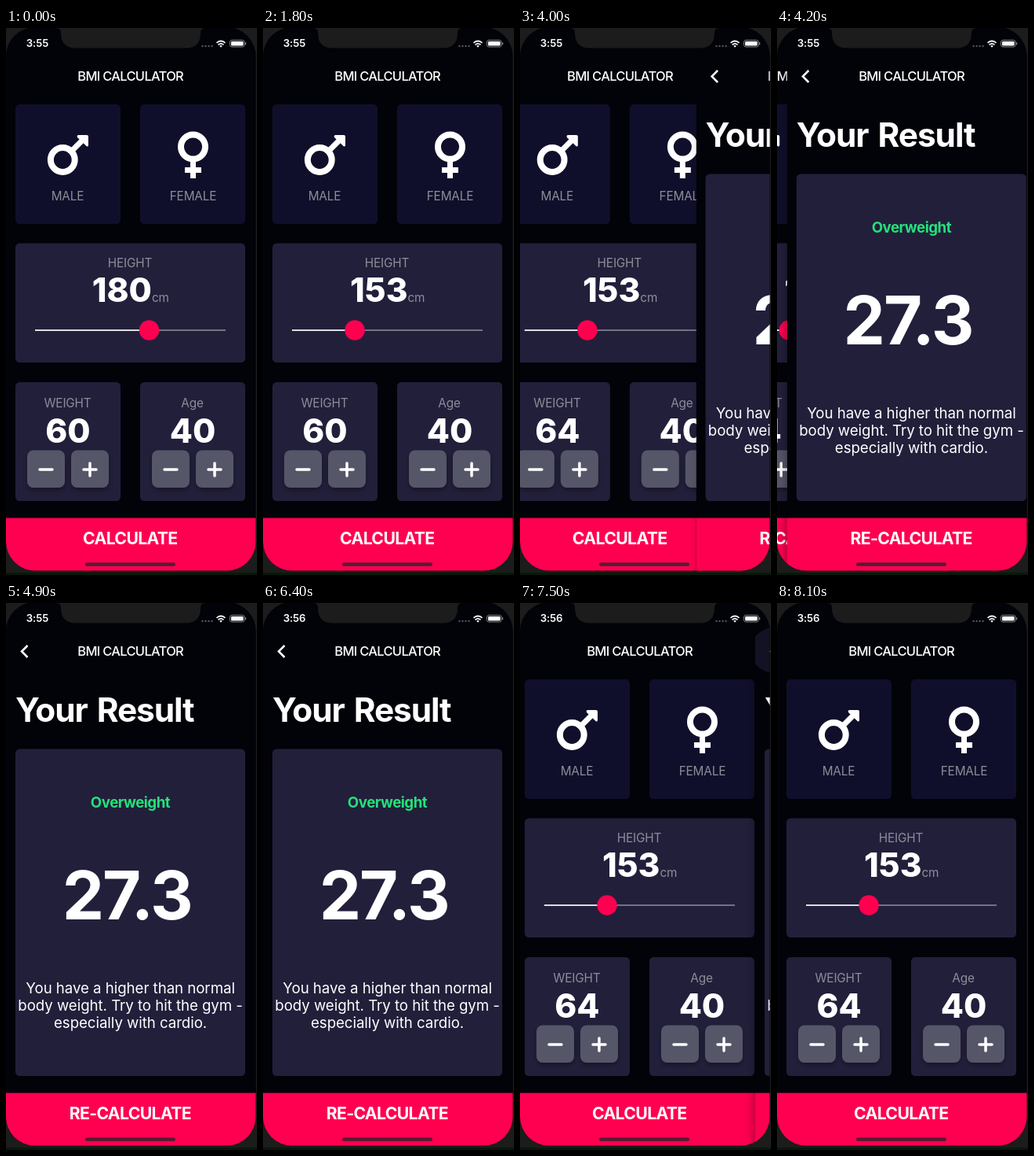
An HTML page that plays this animation: 320x695 px, repeating every 8200 ms.

```html
<!DOCTYPE html>
<html lang="en">
<head>
<meta charset="utf-8">
<title>BMI Calculator</title>
<style>
html, body { margin: 0; width: 100%; height: 100%; overflow: hidden; background: #1b1c1b; }
svg { display: block; width: 320px; height: 695px; }
text { font-family: Inter, Roboto, sans-serif; fill: #fff; text-anchor: middle; white-space: pre; }
.label { font-size: 15.3px; letter-spacing: -.15px; fill: #8d8e98; }
.num { font-size: 42.4px; font-weight: 800; letter-spacing: 0; }
.title { font-size: 16.5px; font-weight: 500; letter-spacing: -.7px; }
.big { font-size: 21.2px; font-weight: 700; letter-spacing: -.65px; }
.body { font-size: 18.7px; letter-spacing: -.06px; }
.heading { font-size: 42.4px; font-weight: 700; letter-spacing: -1.1px; word-spacing: 3.2px; text-anchor: start; }
.grade { font-size: 18.7px; font-weight: 700; letter-spacing: -.5px; fill: #24e27a; }
.bmi { font-size: 84.8px; font-weight: 700; letter-spacing: -2.1px; }
.clock { font-size: 13.2px; font-weight: 600; letter-spacing: -.1px; }
.line { fill: none; stroke: #fff; }
</style>
</head>
<body>
<svg viewBox="0 0 320 695">
  <defs>
    <clipPath id="screen"><rect y="-1" width="318.5" height="690.6" rx="37"/></clipPath>
    <clipPath id="page"><rect width="320" height="695"/></clipPath>
    <linearGradient id="shade">
      <stop offset="0" stop-opacity="0"/>
      <stop offset=".3" stop-opacity=".016"/>
      <stop offset=".6" stop-opacity=".07"/>
      <stop offset="1" stop-opacity=".22"/>
    </linearGradient>
    <filter id="soft" x="-30%" y="-30%" width="160%" height="170%">
      <feDropShadow dx="0" dy="3" stdDeviation="3" flood-color="#000" flood-opacity=".35"/>
    </filter>
  </defs>
  <rect y="692" width="320" height="3" fill="#08190a"/>
  <g clip-path="url(#screen)">
    <rect width="320" height="695" fill="#020308"/>
    <g id="form"></g>
    <g id="result"></g>
    <rect x="101" y="679.3" width="115" height="4.5" rx="2.2" fill="#541c33"/>
  </g>
  <g id="status"></g>
</svg>
<script>
const LOOP = 8200, STEP = 100, WIDTH = 318;
const NAVY = '#100f2b', SLATE = '#221f3b', PINK = '#ff0050';
const $ = id => document.getElementById(id);

const text = (x, y, cls, str, id) =>
  `<text x="${x}" y="${y}" class="${cls}"${id ? ` id="${id}"` : ''}>${str}</text>`;
const card = (x, y, w, h, fill) =>
  `<rect x="${x}" y="${y}" width="${w}" height="${h}" rx="5.5" fill="${fill}"/>`;
const line = (d, w, extra = '') =>
  `<path class="line" d="${d}" stroke-width="${w}" ${extra}/>`;

const button = (x, plus) =>
  `<rect x="${x}" y="536.5" width="48" height="47.5" rx="8" fill="#565769" filter="url(#soft)"/>` +
  line(`M${x + 16} 561h16` + (plus ? `M${x + 24} 553v16` : ''), 3.5, 'stroke-linecap="round"');

const counter = (x, label, value, id) =>
  card(x, 450, 134, 151, SLATE) +
  text(x + 66.5, 482, 'label', label) +
  text(x + 67, 527, 'num', value, id) +
  button(x + 15, false) + button(x + 71, true);

const footer = label =>
  `<rect y="622.5" width="320" height="73" fill="${PINK}"/>` + text(158.3, 655.5, 'big', label);

const male =
  '<circle class="line" cx="72.3" cy="167.5" r="15.4" stroke-width="8"/>' +
  line('M83 157L99 141', 7) +
  '<path d="M92.5 136H103q2 0 2 2v10.5q0 3-2.5 1.5L91 139q-1-3 1.5-3z" fill="#fff"/>';
const female =
  '<circle class="line" cx="238.5" cy="151" r="15.5" stroke-width="8"/>' +
  line('M238.5 169V191M228 180.5H249', 7);

$('form').innerHTML =
  text(158.7, 67, 'title', 'BMI CALCULATOR') +
  card(12, 97, 134, 152, NAVY) + male + text(78.5, 219, 'label', 'MALE') +
  card(171, 97, 134, 152, NAVY) + female + text(238.5, 219, 'label', 'FEMALE') +
  card(12, 273.5, 293, 151.5, SLATE) +
  text(158, 304.3, 'label', 'HEIGHT') +
  '<text x="158.7" y="348"><tspan class="num" id="height">180</tspan><tspan class="label">cm</tspan></text>' +
  '<path d="M37 384H280" stroke="#8d8e98" stroke-width="1.7"/>' +
  line('M37 384H182', 1.7, 'id="track"') +
  `<circle id="thumb" cx="182" cy="384" r="12.7" fill="${PINK}"/>` +
  counter(12, 'WEIGHT', 60, 'weight') +
  counter(171, 'Age', 40, 'age') +
  footer('CALCULATE');

$('result').innerHTML =
  '<rect id="edge" x="-16" width="16" height="695" fill="url(#shade)"/>' +
  '<g clip-path="url(#page)">' +
  '<rect width="320" height="695" fill="#020308"/>' +
  '<circle id="ripple" cx="23" cy="60" r="28.5" fill="#131225"/>' +
  line('M27.5 54L20 61.5L27.5 69', 2.5) +
  text(158.7, 67, 'title', 'BMI CALCULATOR') +
  text(12, 150.5, 'heading', 'Your Result') +
  card(12, 185.5, 293, 415.5, SLATE) +
  text(158.5, 260, 'grade', 'Overweight') +
  text(154.2, 402.3, 'bmi', '27.3') +
  ['You have a higher than normal', 'body weight. Try to hit the gym -', 'especially with cardio.']
    .map((s, i) => text(158.6, 496 + i * 22, 'body', s)).join('') +
  footer('RE-CALCULATE') + '</g>';

$('status').innerHTML =
  '<path d="M64 0q6 0 6 6q0 19.5 19 19.5H229q19 0 19-19.5q0-6 6-6z" fill="#1b1c1b"/>' +
  text(40, 24, 'clock', '3:55', 'clock') +
  [250.5, 254.5, 258.5, 262.5].map(x => `<circle cx="${x}" cy="23" r="1.2" fill="#55565c"/>`).join('') +
  line('M268.5 18.8q5.5-4.6 11 0M270.5 21.3q3.5-2.8 7 0', 1.7) +
  '<path d="M272.2 22.8q1.8-1.4 3.6 0L274 24.8z" fill="#fff"/>' +
  '<rect x="285.5" y="15.5" width="18.5" height="8.5" rx="2.5" fill="none" stroke="#85868c"/>' +
  '<rect x="287" y="17" width="15.5" height="5.5" rx="1.2" fill="#fff"/>' +
  '<path d="M305.5 18.3v3" stroke="#85868c" stroke-width="1.3"/>';

const part = (t, from, dur) => Math.min(1, Math.max(0, (t - from) / dur));
const smooth = p => p * p * (3 - 2 * p);

// Page slide easing: cubic-bezier(.35, .91, .33, .97)
function slide(p) {
  const at = (s, a, b) => 3 * (1 - s) ** 2 * s * a + 3 * (1 - s) * s * s * b + s ** 3;
  let lo = 0, hi = 1;
  for (let i = 0; i < 24; i++) {
    const mid = (lo + hi) / 2;
    if (at(mid, .35, .33) < p) lo = mid; else hi = mid;
  }
  return p >= 1 ? 1 : at(lo, .91, .97);
}

const taps = [2200, 2500, 2800, 3100];

function draw(t) {
  const height = 180 - 27 * smooth(part(t, 400, 1200));
  const x = 37 + (height - 120) * 2.425;
  $('height').textContent = Math.round(height);
  $('thumb').setAttribute('cx', x);
  $('track').setAttribute('d', `M37 384H${x}`);
  $('weight').textContent = 60 + taps.filter(tap => t >= tap).length;
  $('clock').textContent = t < 5200 ? '3:55' : '3:56';

  const push = part(t, 3955, 400), pop = part(t, 7278, 400);
  const shown = slide(push) - slide(pop);
  $('form').setAttribute('transform', `translate(${-shown * WIDTH / 3} 0)`);
  $('result').setAttribute('transform', `translate(${(1 - shown) * WIDTH} 0)`);
  $('result').style.display = shown > 0 ? '' : 'none';
  $('edge').style.opacity = slide(push - pop);
  $('ripple').style.opacity = part(t, 7050, 200);
}

function tick() {
  const t = performance.now() % LOOP;
  draw(Math.floor(t / STEP) * STEP);
  requestAnimationFrame(tick);
}
tick();
</script>
</body>
</html>
```
